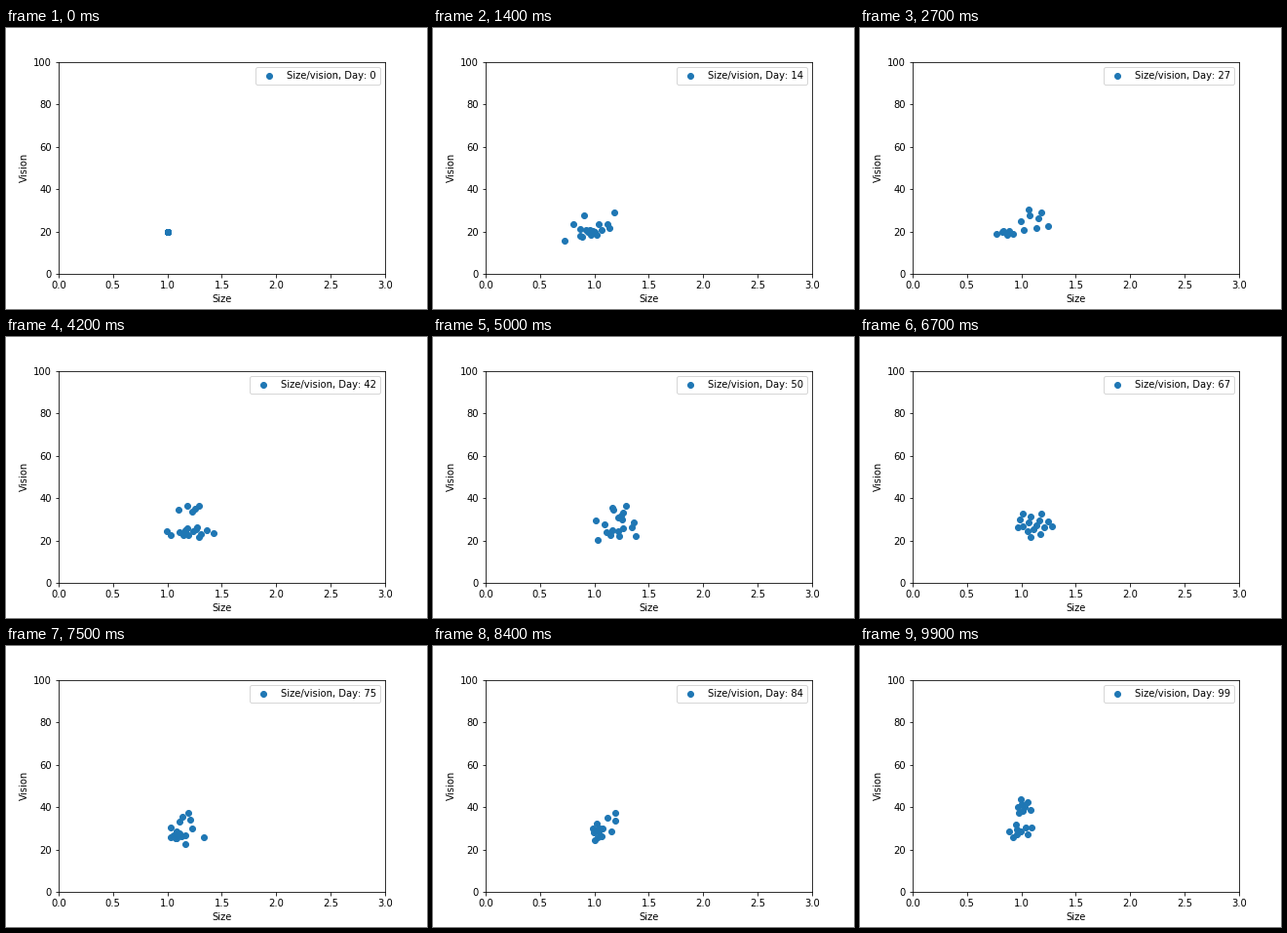
A matplotlib script that plays this animation: 432 by 288 pixels, repeating every 10000 ms.

```python
import numpy as np
import matplotlib.pyplot as plt
from matplotlib.animation import FuncAnimation

plt.rcParams["text.kerning_factor"] = 6  # whole-pixel kerning

DAYS = 100
SLOTS = 19
MUTATION = np.array([0.09, 2.4])
FLOOR = np.array([0.70, 14.0])
GOLDEN = np.pi * (3 - 5 ** 0.5)
rng = np.random.default_rng(11)

# day: clumps of (count, size, vision, size radius, vision radius)
STAGES = {
    27: [(7, 0.85, 19.2, 0.10, 1.3), (8, 1.12, 26.0, 0.17, 6.0)],
    42: [(14, 1.20, 24.0, 0.23, 2.8), (5, 1.23, 35.2, 0.13, 2.2)],
    58: [(13, 1.18, 27.4, 0.19, 5.2)],
    67: [(16, 1.11, 27.5, 0.18, 6.0)],
    84: [(10, 1.03, 28.2, 0.05, 4.4), (4, 1.16, 33.0, 0.08, 5.0)],
    99: [(8, 1.02, 40.3, 0.08, 3.6), (9, 0.98, 28.7, 0.12, 3.8)],
}


def clump(count, size, vision, rx, ry):
    """Spread points evenly, with a little jitter, over an ellipse."""
    i = np.arange(count)
    r = np.sqrt((i + 0.5) / count)
    disc = r * np.array([np.cos(i * GOLDEN), np.sin(i * GOLDEN)])
    disc += rng.normal(0, 0.08, disc.shape)
    return np.column_stack([size + rx * disc[0], vision + ry * disc[1]])


def lineage(here, there, span):
    """Daily positions of one slot: still, with a jump at each birth."""
    births = 1 + np.flatnonzero(rng.random(span) < 0.2)
    if not births.size:
        births = rng.integers(1, span + 1, 1)
    path, pos = [], here
    for step in range(1, span + 1):
        if step == births[-1]:
            pos = there
        elif step in births:
            noise = rng.normal(size=2) * MUTATION * min(1, step / 5)
            drift = here + (there - here) * step / span
            pos = np.maximum(drift + noise, FLOOR)
        path.append(pos)
    return path


history = np.empty((DAYS, SLOTS, 2))
history[0] = (1, 20)
start = 0
for end, clumps in STAGES.items():
    goal = np.resize(np.vstack([clump(*c) for c in clumps]), (SLOTS, 2))
    for slot in range(SLOTS):
        history[start + 1:end + 1, slot] = lineage(
            history[start, slot], goal[slot], end - start)
    start = end

fig, ax = plt.subplots(figsize=(6, 4), dpi=72)
fig.subplots_adjust(left=0.125, right=0.9, bottom=0.125, top=0.88)
dots = ax.scatter(*history[0].T, color="#1f77b4", label="Size/vision, Day: 0")
ax.set(xlim=(0, 3), ylim=(0, 100), xlabel="Size", ylabel="Vision",
       xticks=np.arange(0, 3.1, 0.5), yticks=range(0, 101, 20))
label = ax.legend(loc="upper right").get_texts()[0]


def draw(day):
    crowd = history[day]
    dots.set_offsets(np.unique(crowd, axis=0) if day else crowd)
    label.set_text(f"Size/vision, Day: {day}")
    return dots, label


anim = FuncAnimation(fig, draw, frames=DAYS, init_func=lambda: draw(0),
                     interval=100, repeat=True, repeat_delay=0)
plt.show()
```
